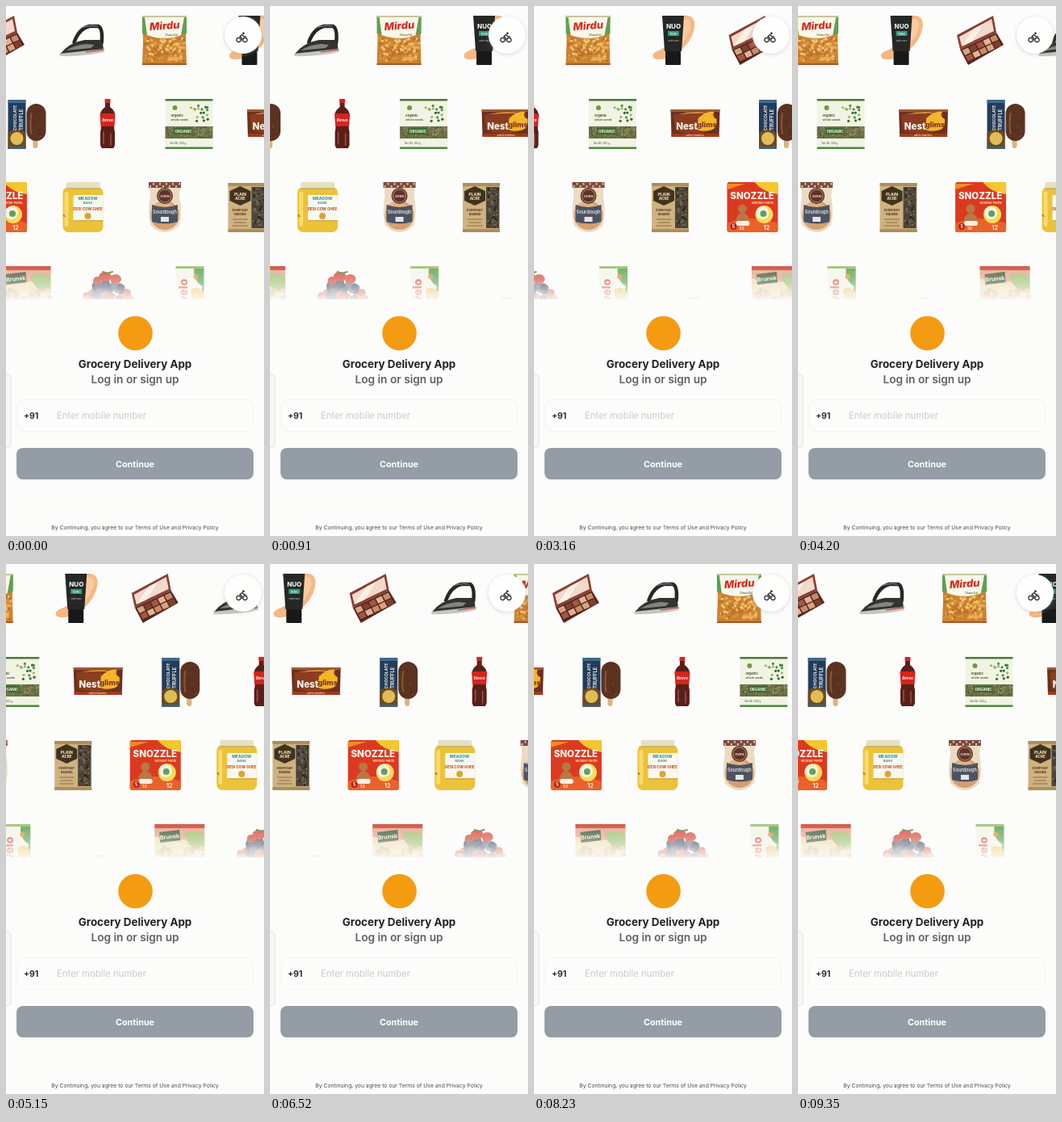
These frames come from a looping animation (320x656 px, 9.46 s). An HTML page:

```html
<!DOCTYPE html>
<html lang="en">
<head>
<meta charset="utf-8">
<title>Grocery Delivery App</title>
<style>
html, body { margin: 0; width: 100%; height: 100%; overflow: hidden; background: #fcfcfb; }
svg { display: block; width: 100%; height: 100%; font-family: Inter, "Open Sans", sans-serif; }
</style>
</head>
<body>
<svg id="stage" viewBox="0 0 320 656"></svg>
<script>
const LOOP = 9460, GAP = 101.5, SPAN = GAP * 4, PAPER = '#fcfcfb';

// Small drawing helpers that return SVG markup
const rect = (x, y, w, h, fill, r = 0, more = '') =>
  `<rect x="${x}" y="${y}" width="${w}" height="${h}" rx="${r}" fill="${fill}" ${more}/>`;
const disc = (x, y, rx, fill, ry = rx, more = '') =>
  `<ellipse cx="${x}" cy="${y}" rx="${rx}" ry="${ry}" fill="${fill}" ${more}/>`;
const path = (d, fill, more = '') => `<path d="${d}" fill="${fill}" ${more}/>`;
const line = (d, color, width) =>
  path(d, 'none', `stroke="${color}" stroke-width="${width}" stroke-linecap="round" stroke-linejoin="round"`);
const text = (x, y, size, fill, str, weight = 700, more = '') =>
  `<text x="${x}" y="${y}" font-size="${size}" fill="${fill}" font-weight="${weight}" ${more}>${str}</text>`;
const mid = (x, y, size, fill, str, weight, more = '') =>
  text(x, y, size, fill, str, weight, 'text-anchor="middle" ' + more);

let seed = 7;
const rnd = () => (seed = seed * 16807 % 2147483647) / 2147483647;
const grains = (n, x, y, w, h, r, colors) => Array.from({ length: n }, (_, i) =>
  disc(x + rnd() * w, y + rnd() * h, r, colors[i % colors.length])).join('');

function palette() {
  const tones = ['#d9a382', '#a5563f', '#c98a68', '#7d4030', '#e0b394'];
  let pans = '';
  for (let i = 0; i < 10; i++)
    pans += rect(.04 + i % 5 * .19, .1 + (i > 4) * .43, .16, .36, tones[(i * 3 + (i > 4)) % 5]);
  return path('M-29 -6 16 -30 20 -9 -25 12Z', '#8b3d33') +
    path('M-26 -4 14 -26 17 -11 -23 8Z', '#f1d9cb') +
    path('M-23 8 -8 -14 4 -20 -10 2Z', '#fbf0e6') +
    path('M-25 12 20 -9 29 6 -15 31Z', '#54261f') +
    `<g transform="matrix(45 -21 9 17 -25 12)">${pans}</g>`;
}

const iron = () =>
  line('M-11 3Q-5 -14 8 -17L19 -17Q25 -14 23 4', '#272724', 4.5) +
  line('M-2 -15Q8 -19 18 -17', '#77777a', 1.2) +
  path('M-28 17Q-17 3 2 0L21 0Q26 5 25 12L-10 18Z', '#33332f') +
  path('M-21 13Q-10 6 4 5L14 6 10 10Z', '#85857f') +
  path('M-29 17 26 11 26 15Q0 21 -29 20Z', '#c5c5c0') +
  line('M4 15 26 12', '#b6352b', 1.2);

const chickpeas = () =>
  path('M-28 -30H27L26 0 27 31H-28L-27 0Z', '#cb8230') +
  path('M-28 -30H27V-8Q0 0 -28 -8Z', '#5da050') +
  path('M-25 -28H24L20 -6Q0 2 -22 -6Z', '#f8f7ea') +
  grains(130, -25, -2, 49, 28, 1.8, ['#e8ae58', '#d9953c', '#f0c678', '#bd7026']) +
  mid(1, -13, 13, '#d8291d', 'Mirdu', 800, 'font-style="italic" transform="rotate(-4)"') +
  mid(8, -5, 3.2, '#5d6b2a', 'Chana Dal', 600) +
  rect(-28, 29, 55, 2, '#a8552c') + rect(-28, -30, 55, 2, '#c8c59c');

const tube = () =>
  path('M15 -30Q32 -32 30 -16Q27 4 6 18Q-10 27 -20 23Q-26 17 -12 12Q8 2 10 -14Z', '#f5b884') +
  path('M17 -26Q27 -27 25 -15Q21 0 10 7Z', '#f9cba0') +
  path('M-10 -30H17L14 14H-7Z', '#252826') + rect(-6, 14, 19, 17, '#171a18', 1) +
  mid(4, -14, 8, '#e6efe4', 'NUO', 800) + rect(-3, -11, 14, 6, '#2f9b82') +
  mid(4, -6.5, 4, '#e6efe4', 'tone', 600) + mid(4, 2, 2.6, '#b6bab0', 'matte base', 500);

const iceCream = () =>
  rect(-22, -30, 22, 61, '#233c5c', 1) + rect(-22, -30, 22, 4, '#3f6a8a') +
  path('M-22 11Q-10 1 0 12V31H-22Z', '#6d4a24') +
  disc(-11, 18, 8, '#e1bd55') + rect(-22, 28, 22, 3, '#41617c') +
  [['CHOCOLATE', -12], ['TRUFFLE', -4]].map(([s, x], i) =>
    text(0, 0, 5 + i, '#f2eee0', s, 700, `transform="translate(${x} 8) rotate(-90)"`)).join('') +
  rect(9, 15, 6, 15, '#dcb17f', 3) + rect(1, -25, 24, 46, '#5b3320', 12) +
  line('M7 -13Q5 0 7 12', '#8a5636', 2) + grains(14, 7, -16, 13, 32, .7, ['#3d1f14', '#7b4a2e']);

const cola = () =>
  rect(-3.5, -31, 7, 5, '#d3281f', 1) +
  path('M-3 -26H3V-21Q10 -16 9 -9Q7 2 9 10L9 26Q8 31 5 30H-5Q-8 31 -9 26L-9 10Q-7 2 -9 -9Q-10 -16 -3 -21Z', '#5a1f19') +
  line('M-5 10V24M4 12V26', '#9c5446', 1.5) +
  path('M-9.5 -13H9.5L8.5 3H-8.5Z', '#d6241e') + mid(0, -3, 4.5, '#fff3ec', 'Bimva', 700, 'font-style="italic"');

const grainPack = () =>
  rect(-30, -31, 59, 62, '#f1f3e4', 1) + rect(-30, -31, 59, 2.5, '#4b7c36') +
  grains(18, 2, -23, 23, 21, 1.6, ['#4f8f3e', '#2f6a34', '#9bb765']) +
  disc(-18, -20, 3, '#6f9b3d') +
  text(-23, -9, 4.2, '#465d2c', 'organic', 700) + text(-23, -4, 3.6, '#465d2c', 'whole seeds', 600) +
  rect(-30, 3, 59, 15, '#6b7045') + grains(60, -29, 4, 57, 13, 1, ['#8f7d55', '#4b5a35', '#a69b72']) +
  rect(-20, 5, 24, 8, '#3e6a31') + text(-18, 10.8, 4.5, '#f6f6e8', 'ORGANIC', 700) +
  rect(-30, 28.5, 59, 2.5, '#4b8a3a') + text(-24, 25, 3, '#59664a', 'Net Wt. 500 g', 500);

const matches = () =>
  path('M-30 -18H31L30 16H-29Z', '#6b3020') + path('M-30 -18H31L31 -15H-30Z', '#a05a30') +
  path('M-27 -11Q0 -20 25 -12L20 8Q0 16 -24 8Z', '#8a3d20') +
  path('M-20 -12Q0 -17 20 -13Q0 -14 -20 -12Z', '#e8a840') +
  path('M4 -7Q14 -17 24 -15Q20 -9 27 -6Q28 7 18 8Q8 10 3 7Z', '#f4b52c') +
  mid(-10, 7, 11.5, '#fff6e8', 'Nest', 800) + mid(15, 4, 9, '#7c3415', 'glims', 800) +
  rect(-29, 12, 59, 4, '#a23b1d') + mid(0, 15.4, 3, '#f5dfb8', 'safety matches', 600);

const diapers = () =>
  rect(-31, -31, 63, 62, '#dc3a20', 3) +
  path('M3 -31H32V-16Q14 -18 3 -31Z', '#f6c62f') + path('M-31 -29H-8L-31 -22Z', '#f08e27') +
  path('M-31 20Q0 8 32 20V28Q32 31 29 31H-28Q-31 31 -31 28Z', '#e9622a') +
  mid(0, -10, 11.5, '#fff8f0', 'SNOZZLE', 800) + mid(13, -4, 4, '#ffe9b0', 'Wonder Pants', 600) +
  disc(15, 9, 11, '#f8da55') + disc(13, 7, 8, '#f3f3e4') + disc(14, 8, 4, '#62a05a') +
  disc(-12, 2, 5.5, '#b97845') + path('M-21 20Q-20 8 -12 7Q-3 8 -3 20Z', '#b97845') +
  rect(-20, 17, 17, 6, '#f5f0e4', 3) + disc(-23, 24, 4, '#b32417') +
  mid(-23, 26, 5.5, '#fff8f0', '5') + mid(-13, 28, 5, '#fff8f0', '32') + mid(18, 28, 7, '#fff8f0', '12');

const ghee = () =>
  rect(-25, -25, 50, 56, '#ecc23a', 7) + rect(-23, -19, 5, 43, '#f8db6a', 3) +
  rect(-21, -31, 42, 9, '#e6e0c0', 2) + rect(-21, -24, 42, 2, '#c8b867') +
  rect(-12, -15, 37, 33, '#f9f8f0', 1) +
  mid(6, -9, 5, '#3b9a96', 'MEADOW', 800) + mid(6, -4.5, 4, '#3b9a96', 'BANK', 700) +
  mid(6, 4, 4.6, '#c15a22', 'DESI COW GHEE', 800) + disc(6, 11, 4, '#d8a437') +
  rect(-12, 16, 37, 2, '#d6b24a') + text(-25, 12, 4, '#715c1a', '1L', 600);

const bread = () =>
  path('M-20 -31H20L18 -14Q22 5 18 22Q10 31 0 31Q-10 31 -18 22Q-22 5 -18 -14Z', '#ecdac2') +
  disc(0, 10, 18, '#d3a070') + disc(-3, 7, 14, '#ddb484') +
  rect(-20, -31, 40, 7, '#7b4b3f') +
  Array.from({ length: 10 }, (_, i) => rect(-19 + i * 4, i % 2 ? -30 : -27, 2, 2.5, '#dcc4b0')).join('') +
  disc(0, -14, 10, '#5f3329') + disc(0, -14, 8, 'none', 8, 'stroke="#d7ab88" stroke-width=".8"') +
  mid(0, -12.5, 4, '#f3dfc7', 'OVEN', 700) +
  path('M-16 -3Q0 3 16 -3V18Q0 23 -16 18Z', '#4c5364') +
  mid(0, 8, 5.6, '#e9e6dd', 'Sourdough', 600) + rect(-5, 12, 10, 6, '#e9e6dd');

const raisins = () =>
  rect(-23, -30, 46, 61, '#cfb280', 1) + rect(6, -25, 16, 51, '#4c4438') +
  grains(75, 7, -24, 14, 49, 1.2, ['#2d2722', '#796d5a', '#5d5342']) +
  rect(-23, -30, 46, 4, '#ab8f5c') + rect(-23, 27, 46, 4, '#ab8f5c') +
  path('M-8 -26 5 -20V-8L-8 -2 -21 -8V-20Z', '#40331f') +
  mid(-8, -14, 5, '#efdab0', 'PLAIN', 800) + mid(-8, -9, 4.6, '#efdab0', 'ACRE', 800) +
  mid(-8, 5, 3.6, '#46351d', 'EVERYDAY', 700) + mid(-8, 10, 3.6, '#46351d', 'RAISINS', 700) +
  line('M-17 15H1M-15 19H-1M-17 23H1', '#8c6d3c', 1);

const frozen = () =>
  rect(-31, -31, 62, 62, '#f0dcb4', 1) + rect(-31, -31, 62, 5, '#cc3d29') +
  path('M-31 -26H31V-18Q0 -6 -31 -16Z', '#e9a08a') +
  path('M-25 -21 0 -24 1 -11 -24 -8Z', '#38552d') +
  mid(-12, -13, 7, '#fff8ec', 'Brunsk', 700, 'transform="rotate(-6 -12 -13)"') +
  path('M5 -20Q20 -25 31 -18V2Q10 0 5 -20Z', '#9dbd6a') +
  grains(40, -30, -2, 60, 20, 3, ['#ecc48c', '#b8c878', '#e8a078']);

const berries = () =>
  grains(40, -26, 2, 54, 14, 5, ['#cf5538', '#52586b', '#dd7c62']) +
  grains(22, -17, -12, 36, 12, 4.5, ['#474d61', '#616b80', '#343c50']) +
  disc(-3, -18, 8, '#d5402f', 6) + disc(10, -15, 7, '#cf4a35', 6) + disc(-13, -13, 5, '#c9432f') +
  line('M-6 -24 0 -22 6 -24', '#56793b', 2);

const oil = () =>
  rect(-17, -31, 35, 62, '#f3f4ea', 1) + rect(-17, -31, 35, 3, '#9abb6b') +
  path('M6 -28H18V20Q12 6 16 -6Q4 -14 6 -28Z', '#54a148') +
  path('M2 -2Q11 -8 18 2V20H4Z', '#ecc25a') +
  text(0, 0, 14, '#d8503a', 'velo', 800, 'transform="translate(-3 14) rotate(-90)"') +
  disc(8, -18, 3, '#e68a35');

const lowPack = () => rect(-6, 7, 12, 24, '#d8d0b8', 1);

const rows = [
  { y: 42, x: -6, items: [palette, iron, chickpeas, tube] },
  { y: 146, x: 24.5, items: [iceCream, cola, grainPack, matches] },
  { y: 249, x: -6, items: [diapers, ghee, bread, raisins] },
  { y: 353, x: 24.5, items: [frozen, berries, oil, lowPack] }
];

const shelf = rows.map(r => r.items.map(draw => `<g class="item">${draw()}</g>`).join('')).join('');

document.getElementById('stage').innerHTML = `
  <defs>
    <linearGradient id="fade" x1="0" x2="0" y1="0" y2="1">
      <stop offset="0" stop-color="${PAPER}" stop-opacity=".1"/>
      <stop offset=".5" stop-color="${PAPER}" stop-opacity=".4"/>
      <stop offset="1" stop-color="${PAPER}" stop-opacity=".9"/>
    </linearGradient>
    <filter id="soft" x="-50%" y="-50%" width="200%" height="200%"><feGaussianBlur stdDeviation="2"/></filter>
  </defs>
  ${rect(0, 0, 320, 656, PAPER)}
  ${shelf}
  ${rect(0, 318, 320, 46, 'url(#fade)')}
  ${rect(0, 363, 320, 293, PAPER)}
  ${disc(294, 37, 23.5, '#a0a0a0', 23.5, 'opacity=".35" filter="url(#soft)"')}
  ${disc(294, 36, 23, '#fefefd')}
  ${disc(288.5, 42, 2.6, 'none', 2.6, 'stroke="#222" stroke-width="1.1"')}
  ${disc(296.5, 42, 2.6, 'none', 2.6, 'stroke="#222" stroke-width="1.1"')}
  ${disc(294.5, 33.8, 1.3, '#222')}
  ${line('M292.5 42.5V39.8L290 37.8 292.8 35.5 295 37.8H297.5', '#222', 1.3)}
  ${disc(160.5, 405, 21.3, '#f59b12')}
  ${mid(160, 448, 13.4, '#222222', 'Grocery Delivery App')}
  ${mid(160, 467, 13.7, '#616161', 'Log in or sign up', 600)}
  ${rect(13.5, 487.5, 293, 39, PAPER, 9, 'stroke="#f3f3f2"')}
  ${text(22, 511, 10.4, '#2c2c2c', '+91')}
  ${text(63, 511, 11.2, '#d2d2d0', 'Enter mobile number', 500)}
  ${rect(13, 547, 294, 39, '#949da6', 8)}
  ${mid(160, 571, 10.8, '#fefefd', 'Continue')}
  ${mid(160, 648, 6.8, '#4c4c4c', 'By Continuing, you agree to our Terms of Use and Privacy Policy', 400)}
  ${rect(-6, 455.5, 12, 91, '#f8f8f6', 4, 'id="tab" stroke="#e3e3e0"')}`;

// The picture advances in short holds: [first change, last change, count]
const bursts = [[100, 1040, 9], [1150, 2000, 8], [2130, 3050, 9], [3160, 4050, 9], [4200, 4200, 1],
  [4380, 5280, 9], [5390, 6280, 9], [6390, 6730, 4], [6870, 6960, 2], [7100, 8010, 9],
  [8120, 9020, 9], [9130, 9350, 3]];
const steps = [0];
for (const [a, b, n] of bursts)
  for (let i = 0; i < n; i++) steps.push(a + (n > 1 ? (b - a) * i / (n - 1) : 0));

// Scroll distance over time
const track = [[0, 0], [1760, 69.5], [3160, 129.5], [5150, 214.5], [6520, 273], [8230, 348], [9350, 396]];
function scrollAt(t) {
  let i = 1;
  while (i < track.length - 1 && t > track[i][0]) i++;
  const [t0, d0] = track[i - 1], [t1, d1] = track[i];
  return d0 + (d1 - d0) * (t - t0) / (t1 - t0);
}

const items = [...document.querySelectorAll('.item')];
const tab = document.getElementById('tab');
const start = performance.now();

function frame() {
  const now = (performance.now() - start) % LOOP;
  const t = steps.filter(s => s <= now + 20).pop();
  const shift = scrollAt(t);
  items.forEach((el, i) => {
    const row = rows[i >> 2];
    const x = (row.x + i % 4 * GAP - shift + 45 + 2 * SPAN) % SPAN - 45;
    el.setAttribute('transform', `translate(${x.toFixed(2)} ${row.y})`);
  });
  tab.setAttribute('fill', t >= 1150 && t < 2130 ? '#e9e9e4' : '#f8f8f6');
  requestAnimationFrame(frame);
}
frame();
</script>
</body>
</html>
```
